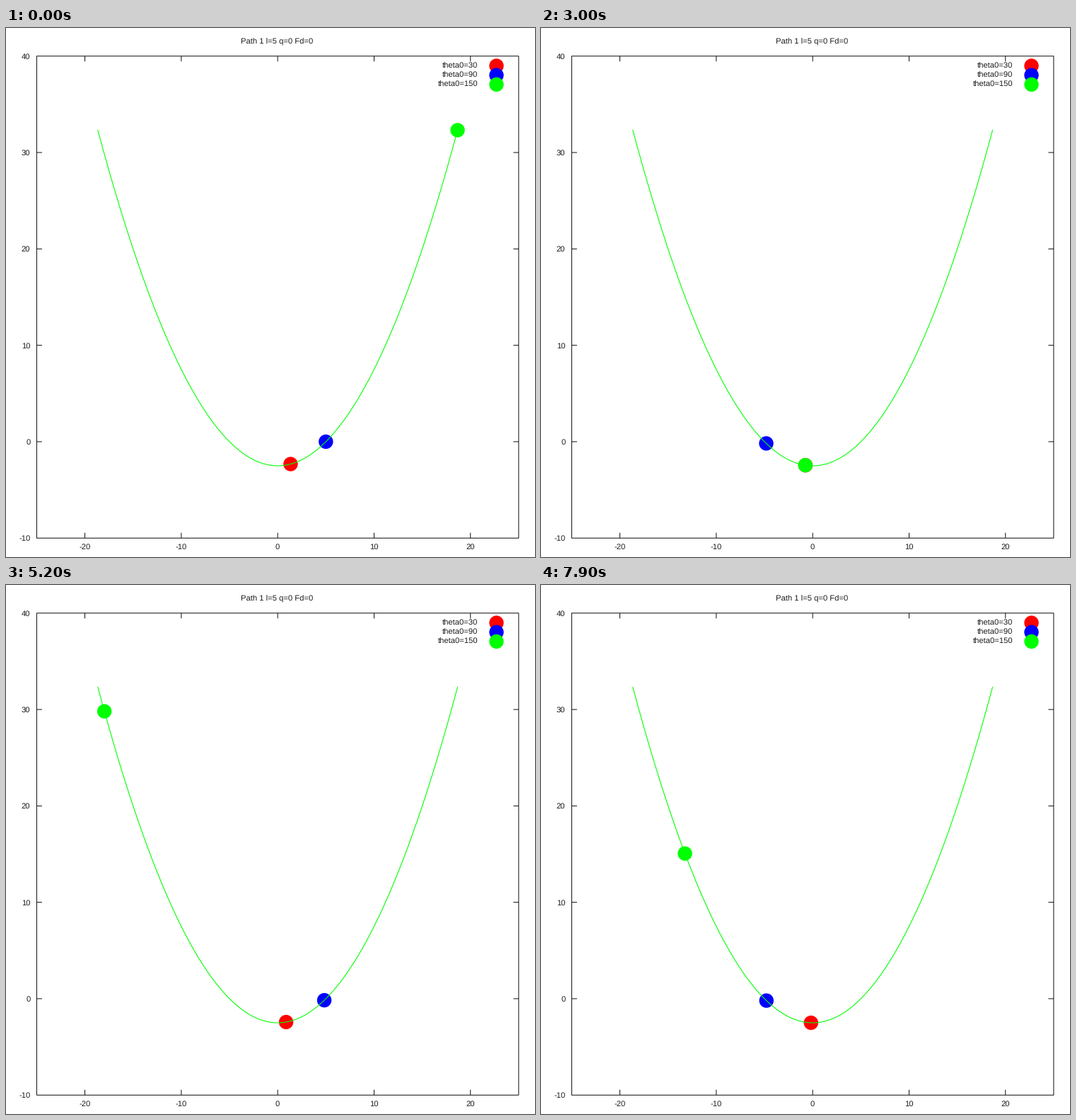
Write a matplotlib script that moves like this. It is 748 px wide and 748 px high and loops after 8000 ms.

```python
import numpy as np
import matplotlib.pyplot as plt
from matplotlib.animation import FuncAnimation
from matplotlib.patches import Circle, Rectangle

SIZE, DPI = 748, 100
FRAMES, STEP_MS = 80, 100
LEFT, TOP, SIDE = 43.4, 39.75, 681.5   # plot box in pixels
UNIT = SIDE / 50                       # pixels per data unit
PT = 72 / DPI                          # points per pixel
L, G = 5, 9.8
RADIUS = 10.2 / UNIT
TICK = 7.5 / UNIT
INK = "#1c1c1c"
BALLS = [(30, "#ff0000", 2), (90, "#0000ff", 3), (150, "#00ff00", 5)]

plt.rcParams.update({
    "font.family": "Liberation Sans",
    "font.size": 11.2 * PT,
    "text.color": INK,
    "text.hinting": "none",
    "axes.unicode_minus": False,
})


def parabola(x):
    return x ** 2 / (2 * L) - L / 2


def amplitude(theta):
    return L * np.tan(np.radians(theta) / 2)


def at(px, py):
    """Data coordinates of a pixel counted from the top left."""
    return (px - LEFT) / UNIT - 25, 40 - (py - TOP) / UNIT


def slide(amp, times):
    """Frictionless bead on the parabola, released at rest from x = amp."""
    u = np.linspace(0, 6 * np.pi, 20001)
    rate = np.sqrt(1 + (amp / L * np.cos(u)) ** 2) / np.sqrt(G / L)
    steps = (rate[1:] + rate[:-1]) / 2 * np.diff(u)
    t = np.concatenate([[0], np.cumsum(steps)])
    return amp * np.cos(np.interp(times, t, u))


def disc(center, color, z):
    return ax.add_patch(Circle(center, RADIUS, fc=color, lw=0, zorder=z))


def draw_frame(xticks, yticks):
    """Border and inward ticks, left unsnapped so they keep their place."""
    style = dict(lw=0.95 * PT, snap=False, zorder=1)
    ax.add_patch(Rectangle((-25, -10), 50, 50, fill=False, ec="black",
                           clip_on=False, **style))
    for start, end in ((-10, -10 + TICK), (40 - TICK, 40)):
        ax.vlines(xticks, start, end, color="black", **style)
    for start, end in ((-25, -25 + TICK), (25 - TICK, 25)):
        ax.hlines(yticks, start, end, color="black", **style)


fig = plt.figure(figsize=(SIZE / DPI, SIZE / DPI), dpi=DPI, facecolor="white")
ax = fig.add_axes([LEFT / SIZE, 1 - (TOP + SIDE) / SIZE, SIDE / SIZE, SIDE / SIZE])
ax.spines[:].set_visible(False)
ax.set(xticks=range(-20, 21, 10), yticks=range(-10, 41, 10))
ax.tick_params(length=0, labelcolor=INK)
ax.tick_params(axis="x", pad=8 * PT)
ax.tick_params(axis="y", pad=9 * PT)
draw_frame(range(-20, 21, 10), range(0, 31, 10))
ax.text(*at(383, 23), "Path 1 l=5 q=0 Fd=0", ha="center")

end = amplitude(150)
xs = np.linspace(-end, end, 400)
ax.plot(xs, parabola(xs), color="#00ff00", lw=1.1 * PT, zorder=4)

times = np.arange(FRAMES) * STEP_MS / 1000
balls, paths = [], []
for i, (theta, color, z) in enumerate(BALLS):
    y = 53.5 + 13.2 * i
    ax.text(*at(667, y + 3.3), f"theta0={theta}", ha="right")
    disc(at(693.5, y), color, z)
    path = slide(amplitude(theta), times)
    paths.append(path)
    balls.append(disc((path[0], parabola(path[0])), color, z))

ax.set(xlim=(-25, 25), ylim=(-10, 40))


def update(n):
    for ball, path in zip(balls, paths):
        ball.center = path[n], parabola(path[n])
    return balls


anim = FuncAnimation(fig, update, frames=FRAMES, interval=STEP_MS,
                     repeat=True, repeat_delay=0)
plt.show()
```
